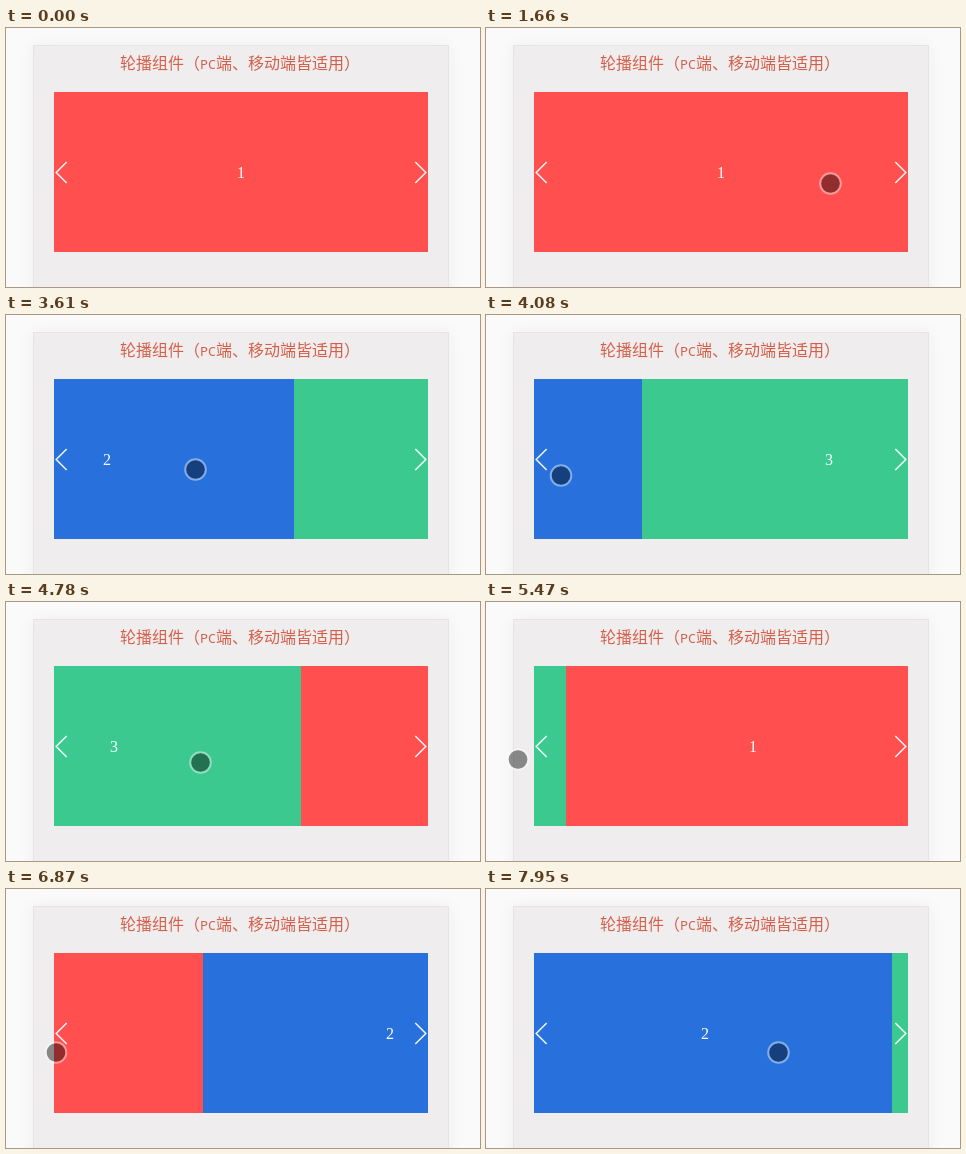
These frames come from a looping animation (474x259 px, 8000 ms). An HTML page with a canvas:

```html
<!DOCTYPE html>
<html lang="zh-CN">
<head>
<meta charset="utf-8">
<title>轮播组件</title>
<style>
  html, body { margin: 0; width: 100%; height: 100%; overflow: hidden; background: #fafafa; }
  canvas { display: block; width: 474px; height: 259px; }
</style>
</head>
<body>
<canvas id="stage" width="474" height="259"></canvas>
<script>
const ctx = document.getElementById('stage').getContext('2d');
const LOOP = 8000;
const VIEW = { x: 48, y: 64, w: 374, h: 160 };
const COLORS = ['#ff4f4f', '#2870dc', '#3cc990'];

// The picture refreshes on a steady tick once the pointer appears
const ENTER = 255;
const TICK = 77.68;

// Phases of a swipe, in ms after its start
const HOLD = 200, RESUME = 360, REACH = 700, RELEASE = 774;
const SETTLE = 300, RETURN = 400;

// x: press, hold: mid-drag pause, left: furthest reach, back: time the hand returns
const SWIPES = [
  { start: 1655, x: 344.5, hold: 291.5, left: 121.5, back: 2740, y: 155.5 },
  { start: 3250, x: 323.5, hold: 189.5, left: 75, back: 4110, y: 154.5 },
  { start: 4577, x: 321.5, hold: 192, left: 32, back: 5620, y: 160.5 },
  { start: 6122, x: 275.5, hold: 136.5, left: 50, back: 7060, y: 157.5 },
  { start: 7690, x: 308.5, hold: 292.5, left: 60, back: LOOP, y: 163.5 }
];

// Smooth 0 to 1 between two times
function smooth(t, from, to) {
  const k = Math.min(1, Math.max(0, (t - from) / (to - from)));
  return k * k * (3 - 2 * k);
}

// CSS "ease": cubic-bezier(.25, .1, .25, 1)
function ease(p) {
  const curve = (u, a, b) => 3 * u * (1 - u) ** 2 * a + 3 * u * u * (1 - u) * b + u ** 3;
  let lo = 0, hi = 1;
  for (let i = 0; i < 20; i++) {
    const mid = (lo + hi) / 2;
    if (curve(mid, 0.25, 0.25) < p) lo = mid; else hi = mid;
  }
  return curve(lo, 0.1, 1);
}

function heldTime(t) {
  return t < ENTER ? 0 : ENTER + Math.floor((t - ENTER) / TICK) * TICK;
}

function enteringPointer(t) {
  const rise = smooth(t, ENTER, 570);
  const cross = smooth(t, 650, 1140);
  const approach = smooth(t, 1300, SWIPES[0].start);
  return {
    x: 409 + 12 * rise - 56.5 * cross - 20 * approach,
    y: 242 - 109 * rise + 22.5 * cross
  };
}

function pointerAt(t) {
  const index = SWIPES.filter(s => s.start <= t).length - 1;
  if (index < 0) return enteringPointer(t);
  const s = SWIPES[index];
  const next = SWIPES[index + 1] || s;
  const u = t - s.start;
  const pull = smooth(u, RESUME, REACH);
  return {
    x: s.x + (s.hold - s.x) * smooth(u, 0, HOLD)
      + (s.left - s.hold) * pull
      + (next.x - s.left) * smooth(t, s.back, s.back + RETURN),
    y: s.y + (next.y - s.y) * pull
  };
}

function scrollAt(t) {
  let total = 0;
  for (const s of SWIPES) {
    if (t < s.start) break;
    const release = s.start + RELEASE;
    const pulled = s.x - pointerAt(Math.min(t, release)).x;
    const k = t > release ? ease(Math.min(1, (t - release) / SETTLE)) : 0;
    total += pulled + (VIEW.w - pulled) * k;
  }
  return Math.round(total);
}

function drawText(text, x, y, font, color, align) {
  ctx.font = font;
  ctx.fillStyle = color;
  ctx.textAlign = align;
  ctx.fillText(text, x, y);
}

function drawPanel() {
  ctx.fillStyle = '#fafafa';
  ctx.fillRect(0, 0, 474, 259);
  ctx.save();
  ctx.shadowColor = 'rgba(0,0,0,.05)';
  ctx.shadowBlur = 16;
  ctx.fillStyle = '#efeded';
  ctx.fillRect(27, 17, 416, 300);
  ctx.restore();
  ctx.strokeStyle = '#e6e4e4';
  ctx.lineWidth = 1;
  ctx.strokeRect(27.5, 17.5, 415, 300);

  const cjk = '300 16px "Noto Sans CJK SC", "Noto Sans CJK", sans-serif';
  const latin = '300 13.33px "Noto Sans Mono", monospace';
  const color = '#d4604b';
  drawText('轮播组件（', 114, 41, cjk, color, 'left');
  drawText('PC', 194, 41, latin, color, 'left');
  drawText('端、移动端皆适用）', 210, 41, cjk, color, 'left');
}

function drawSlides(scroll) {
  ctx.save();
  ctx.beginPath();
  ctx.rect(VIEW.x, VIEW.y, VIEW.w, VIEW.h);
  ctx.clip();
  const first = Math.floor(scroll / VIEW.w);
  for (let i = first; i < first + 2; i++) {
    const x = VIEW.x + i * VIEW.w - scroll;
    ctx.fillStyle = COLORS[i % 3];
    ctx.fillRect(x, VIEW.y, VIEW.w, VIEW.h);
    drawText(i % 3 + 1, x + VIEW.w / 2, 150, '16px "Liberation Serif", serif', '#fff', 'center');
  }
  ctx.restore();
}

function drawArrow(tip, dir) {
  ctx.beginPath();
  ctx.moveTo(tip - dir * 10.5, 134);
  ctx.lineTo(tip, 144.5);
  ctx.lineTo(tip - dir * 10.5, 155);
  ctx.strokeStyle = 'rgba(255,255,255,.9)';
  ctx.lineWidth = 1.6;
  ctx.stroke();
}

function drawPointer({ x, y }) {
  ctx.beginPath();
  ctx.arc(x, y, 9.5, 0, Math.PI * 2);
  ctx.fillStyle = 'rgba(0,0,0,.43)';
  ctx.fill();
  ctx.beginPath();
  ctx.arc(x, y, 10.3, 0, Math.PI * 2);
  ctx.strokeStyle = 'rgba(255,255,255,.42)';
  ctx.lineWidth = 2;
  ctx.stroke();
}

function render(now) {
  const t = heldTime(now % LOOP);
  drawPanel();
  drawSlides(scrollAt(t));
  drawArrow(50.2, -1);
  drawArrow(419.8, 1);
  if (t >= ENTER) drawPointer(pointerAt(t));
}

const origin = performance.now();
function tick() {
  render(performance.now() - origin);
  requestAnimationFrame(tick);
}
tick();
</script>
</body>
</html>
```
